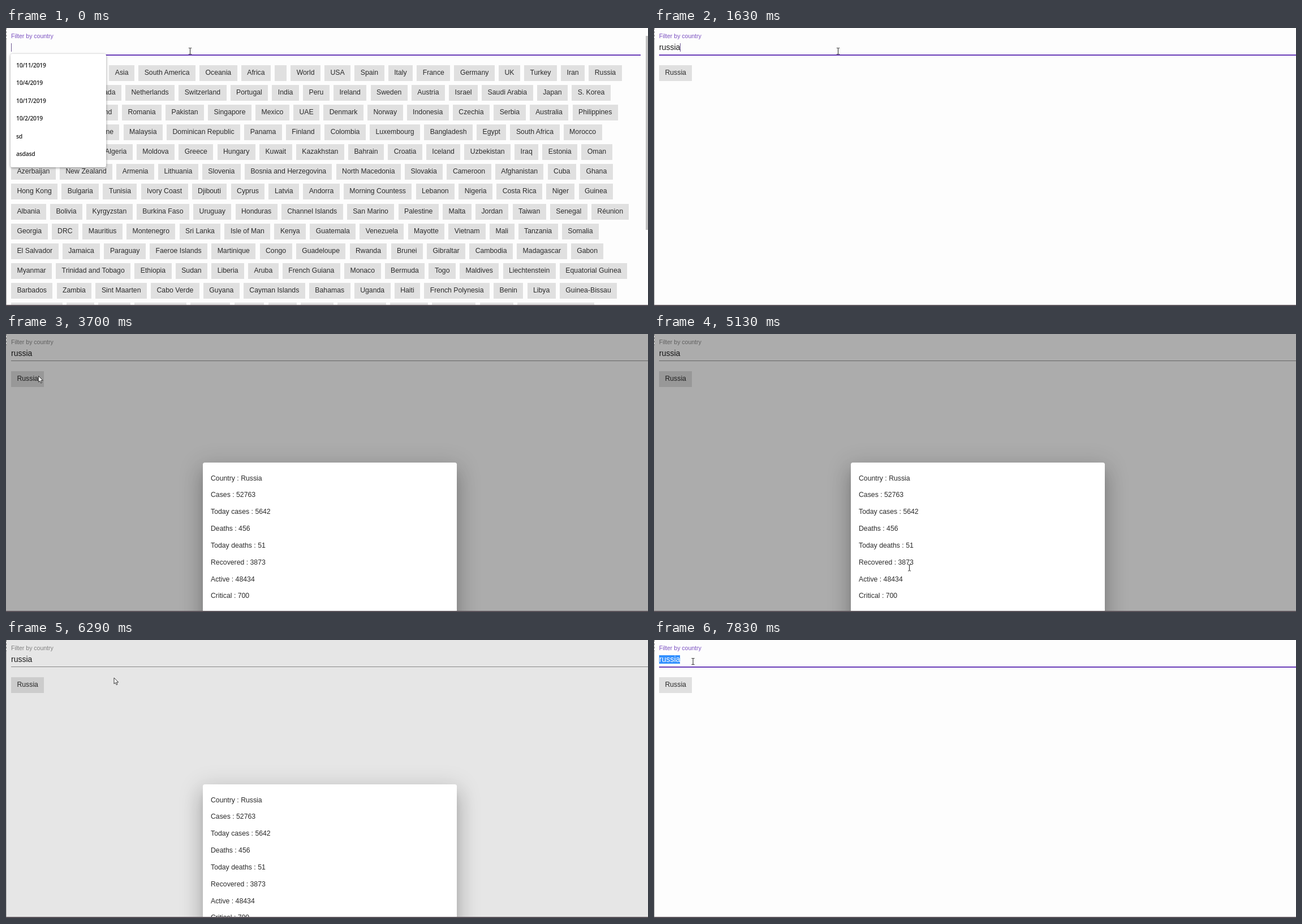
An HTML page that plays this animation: 1135 by 493 pixels, repeating every 8000 ms.

```html
<!DOCTYPE html>
<html lang="en">
<head>
<meta charset="utf-8">
<title>Filter by country</title>
<style>
html, body { margin: 0; width: 100%; height: 100%; overflow: hidden; background: #fdfdfd; }
body { position: relative; font: 12.28px "Liberation Sans", Arial, sans-serif; color: #2b2b2b; }
body > *, #menu div, #dialog div { position: absolute; white-space: pre; }
#edge { left: 0; top: 20px; width: 1px; height: 471px; background: #a9a9a9; }
#nick { left: 0; top: 0; width: 1px; height: 20px; background: repeating-linear-gradient(#777 0 3px, #ddd 3px 6px); }
#label { left: 9px; top: 8px; font-size: 10.53px; line-height: 13px; color: #8c8c8c; }
#value { left: 9px; top: 27px; font-size: 14.03px; line-height: 15px; height: 15px; color: #1c1c1c; }
#caret { top: 27px; width: 1px; height: 15px; background: #6d5a92; }
#line { left: 9px; right: 0; top: 47px; height: 1px; background: #949494; }
#chips { left: 9px; right: 0; top: 66px; display: flex; flex-wrap: wrap; gap: 7.09px 7.17px; }
.chip { box-sizing: border-box; height: 28px; padding: 0 10.45px; line-height: 27px; background: #e0e0e0; }
.focus #label { color: #7a4fc0; }
.focus #line { height: 2px; background: #673ab7; }
.scroll #line, .scroll #chips { right: 13px; }
.selected #value { background: #3390ff; color: #fff; }
#menu { left: 8px; top: 46px; width: 169px; height: 201px; background: #fff; border-radius: 3px;
  box-shadow: 0 1px 4px rgba(0,0,0,.4); font: 600 10.4px "Open Sans", "Noto Sans", sans-serif; letter-spacing: -.3px; color: #222; }
#menu div { left: 10px; line-height: 20px; }
#bar { left: 1131px; top: 14px; width: 4px; height: 344px; background: #c1c1c1; }
#shade { left: 1px; top: 0; right: 0; height: 492px; background: #000; }
#dialog { left: 348px; width: 449px; height: 300px; background: #fff; border-radius: 3.5px;
  box-shadow: 0 10px 13px -6px rgba(0,0,0,.2), 0 21px 33px 3px rgba(0,0,0,.14), 0 8px 40px 7px rgba(0,0,0,.12); }
#dialog div { left: 14px; line-height: 20px; }
#floor { left: 0; right: 0; top: 491px; height: 2px; background: #5a535a; }
#cursor { left: 0; top: 0; overflow: visible; }
</style>
</head>
<body>
<div id="edge"></div><div id="nick"></div>
<div id="label">Filter by country</div>
<div id="value"></div><div id="caret"></div><div id="line"></div>
<div id="chips"></div>
<div id="menu"></div><div id="bar"></div>
<div id="shade"></div><div id="dialog"></div>
<div id="floor"></div>
<svg id="cursor" width="16" height="20">
  <path id="beam" d="M-2.5-5.5H-.8L0-5 .8-5.5H2.5M0-5V5M-2.5 5.5H-.8L0 5 .8 5.5H2.5" fill="none" stroke="#222"/>
  <path id="arrow" d="M.5.5V11.2L3 9 4.7 13 6.5 12.2 4.8 8.4H8.2Z" fill="#fff" stroke="#222" stroke-width=".9"/>
</svg>
<script>
const places = `North America,Europe,Asia,South America,Oceania,Africa,,World,USA,Spain,Italy,France,Germany,UK,Turkey,Iran,Russia,
Brazil,Belgium,Canada,Netherlands,Switzerland,Portugal,India,Peru,Ireland,Sweden,Austria,Israel,Saudi Arabia,Japan,S. Korea,
Ecuador,Chile,Poland,Romania,Pakistan,Singapore,Mexico,UAE,Denmark,Norway,Indonesia,Czechia,Serbia,Australia,Philippines,
Qatar,Belarus,Ukraine,Malaysia,Dominican Republic,Panama,Finland,Colombia,Luxembourg,Bangladesh,Egypt,South Africa,Morocco,
Argentina,Thailand,Algeria,Moldova,Greece,Hungary,Kuwait,Kazakhstan,Bahrain,Croatia,Iceland,Uzbekistan,Iraq,Estonia,Oman,
Azerbaijan,New Zealand,Armenia,Lithuania,Slovenia,Bosnia and Herzegovina,North Macedonia,Slovakia,Cameroon,Afghanistan,Cuba,Ghana,
Hong Kong,Bulgaria,Tunisia,Ivory Coast,Djibouti,Cyprus,Latvia,Andorra,Morning Countess,Lebanon,Nigeria,Costa Rica,Niger,Guinea,
Albania,Bolivia,Kyrgyzstan,Burkina Faso,Uruguay,Honduras,Channel Islands,San Marino,Palestine,Malta,Jordan,Taiwan,Senegal,Réunion,
Georgia,DRC,Mauritius,Montenegro,Sri Lanka,Isle of Man,Kenya,Guatemala,Venezuela,Mayotte,Vietnam,Mali,Tanzania,Somalia,
El Salvador,Jamaica,Paraguay,Faeroe Islands,Martinique,Congo,Guadeloupe,Rwanda,Brunei,Gibraltar,Cambodia,Madagascar,Gabon,
Myanmar,Trinidad and Tobago,Ethiopia,Sudan,Liberia,Aruba,French Guiana,Monaco,Bermuda,Togo,Maldives,Liechtenstein,Equatorial Guinea,
Barbados,Zambia,Sint Maarten,Cabo Verde,Guyana,Cayman Islands,Bahamas,Uganda,Haiti,French Polynesia,Benin,Libya,Guinea-Bissau,
Sierra Leone,Syria,Eritrea,Mozambique,Mongolia,Nepal,Chad,Macao,Saint Martin,Eswatini,Zimbabwe,Angola,Antigua and Barbuda,
Timor-Leste,Curaçao,CAR,Grenada,St. Vincent Grenadines,Turks and Caicos,Greenland,Montserrat,Nicaragua,Suriname,Mauritania,
St. Barth,Western Sahara,British Virgin Islands,Burundi,Caribbean Netherlands,Sao Tome and Principe,Saint Pierre Miquelon`
  .replace(/\n/g, '').split(',');
const facts = ['Country : Russia', 'Cases : 52763', 'Today cases : 5642', 'Deaths : 456',
  'Today deaths : 51', 'Recovered : 3873', 'Active : 48434', 'Critical : 700'];
const recent = ['10/11/2019', '10/4/2019', '10/17/2019', '10/2/2019', 'sd', 'asdasd'];

const LOOP = 8000, BLINK = 530;
const WORD = 'russia', keys = [680, 810, 1090, 1250, 1630, 1630];
const HOVER = 2910, PRESS = 3230, OPEN = 3390, SETTLED = 3690;
const CLOSE = 6290, CLOSED = 6430, FOCUS = 6750, SELECT = 7830;

// Mouse moves, each shown in a few even steps
const moves = [
  { start: 2440, end: 3390, steps: 7, from: [285, 43], to: [57, 74] },
  { start: 4000, end: 4970, steps: 7, from: [62, 82], to: [465, 362] },
  { start: 5130, end: 6140, steps: 8, from: [451.5, 414.5], to: [586, 133], dip: 130 },
  { start: 6290, end: 7000, steps: 6, from: [190.5, 66.5], to: [69, 38] },
];

const $ = id => document.getElementById(id);
const column = (list, top, step) => list.map((s, i) => `<div style="top:${top + i * step}px">${s}</div>`).join('');
const mix = (a, b, k) => a + (b - a) * k;
const easeOut = (p, power) => 1 - (1 - p) ** power;

function stepped(t, start, end, steps) {
  const p = Math.min(1, Math.max(0, (t - start) / (end - start)));
  return Math.floor(p * (steps - 1) + 1e-6) / (steps - 1);
}

$('menu').innerHTML = column(recent, 9.5, 31.5);
$('dialog').innerHTML = column(facts, 17.5, 29.85);

function pointer(t) {
  const m = moves.filter(m => m.start <= t).pop();
  if (!m) return [325.5, 41];
  const p = stepped(t, m.start, m.end, m.steps), k = easeOut(p, m.dip ? 1 : 2);
  return [mix(m.from[0], m.to[0], k), mix(m.from[1], m.to[1], k) + (m.dip || 0) * Math.sin(Math.PI * p)];
}

function dialogPose(t) {
  if (t < OPEN || t >= CLOSED) return null;
  if (t >= CLOSE) return { top: 256, shade: .09 };
  const p = stepped(t, OPEN, SETTLED, 3);
  return { top: mix(502, 228, easeOut(p, 3)), shade: .32 * p };
}

function chipFill(t) {
  if (t < HOVER || t >= SETTLED) return '#e0e0e0';
  if (t < PRESS) return '#d2d2d2';
  const r = 84 * stepped(t, PRESS, SETTLED, 4);
  return `radial-gradient(circle at 48px 14px, #adadad ${r - .5}px, #bfbfbf ${r + .5}px)`;
}

let shown = null;
function filter(query) {
  if (query === shown) return;
  shown = query;
  $('value').textContent = query;
  $('chips').innerHTML = places.filter(p => p.toLowerCase().includes(query))
    .map(p => `<div class="chip">${p}</div>`).join('');
}

function render(t) {
  const query = WORD.slice(0, keys.filter(k => k <= t).length);
  const focus = t < PRESS || t >= FOCUS, selected = t >= SELECT;
  filter(query);
  if (query === WORD) $('chips').firstChild.style.background = chipFill(t);

  const state = document.body.classList;
  state.toggle('focus', focus);
  state.toggle('scroll', !query);
  state.toggle('selected', selected);
  $('menu').hidden = $('bar').hidden = query !== '';

  // The caret restarts its blink at every key and on focus
  const woken = [-260, ...keys, FOCUS].filter(k => k <= t).pop();
  $('caret').hidden = !focus || selected || Math.floor((t - woken) / BLINK) % 2 === 1;
  $('caret').style.left = Math.floor(8.7 + $('value').getBoundingClientRect().width + (query ? 0 : .3)) + 'px';

  const pose = dialogPose(t);
  $('dialog').hidden = $('shade').hidden = !pose;
  if (pose) {
    $('dialog').style.top = pose.top + 'px';
    $('shade').style.opacity = pose.shade;
  }

  const [x, y] = pointer(t);
  const overText = y < 50 || (pose && x > 360 && x < 470 && y > pose.top + 14);
  $('cursor').style.transform = `translate(${x}px,${y}px)`;
  $('beam').style.display = overText ? '' : 'none';
  $('arrow').style.display = overText ? 'none' : '';
}

const start = performance.now();
function frame() {
  render((performance.now() - start) % LOOP);
  requestAnimationFrame(frame);
}
frame();
</script>
</body>
</html>
```
